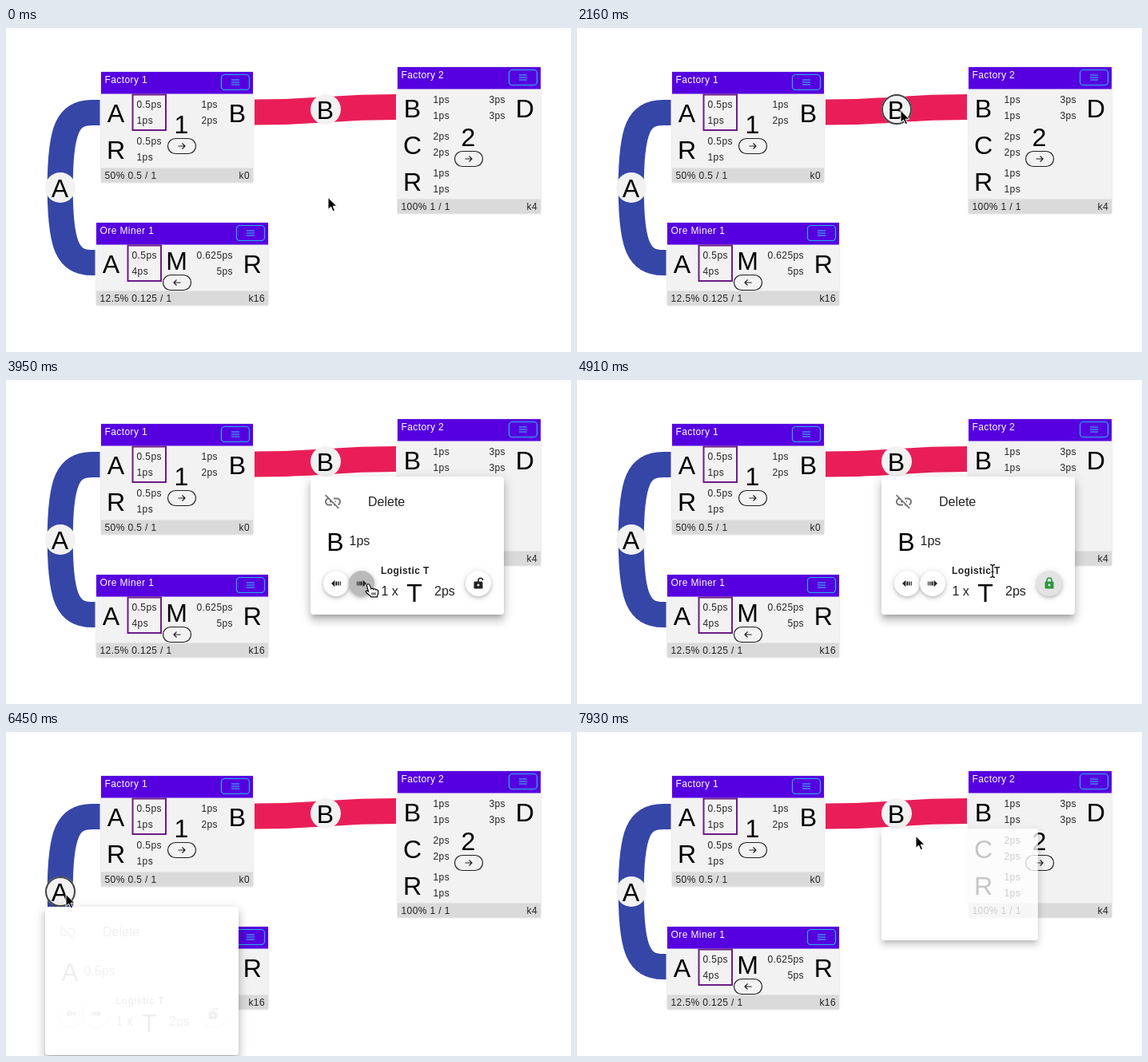
Animation of 707 by 406 pixels, one loop 8000 ms. Source, as an HTML page:

```html
<!DOCTYPE html>
<html lang="en">
<head>
<meta charset="utf-8">
<title>Factory planner</title>
<style>
  html, body { margin: 0; width: 100%; height: 100%; overflow: hidden; background: #fff; }
  svg { position: absolute; left: 0; top: 0; overflow: visible; font-family: "Liberation Sans", Arial, sans-serif; }
  .small { font-size: 12px; letter-spacing: .4px; }
  .mid { font-size: 16px; }
  .big { font-size: 32px; text-anchor: middle; }
  .end { text-anchor: end; }
  .card { filter: drop-shadow(0 0 1px #0003); }
  .fab { filter: drop-shadow(0 2px 2px #0003) drop-shadow(0 1px 4px #0002); }
  .menu { position: absolute; width: 242px; border-radius: 4px; background: #fff; transform-origin: 0 0;
    box-shadow: 0 5px 5px -3px #0003, 0 8px 10px 1px #00000024, 0 3px 14px 2px #0000001f; }
</style>
</head>
<body>
<svg id="scene" width="707" height="406"></svg>
<svg id="pointer" width="707" height="406" style="z-index:2"></svg>
<script>
const LOOP = 8000;
const $ = id => document.getElementById(id);
const text = (x, y, s, cls = 'small', fill = '#222') =>
  `<text x="${x}" y="${y}" class="${cls}" fill="${fill}">${s}</text>`;
const rect = (x, y, w, h, attrs) => `<rect x="${x}" y="${y}" width="${w}" height="${h}" ${attrs}/>`;
const big = (x, y, s) => text(x, y, s, 'big', '#000');

// Each port: letter, upper rate, lower rate
function card({ x, y, w, h, title, inputs, output, recipe, px, py, dir, boxed, load, key }) {
  const r = x + w;
  const rates = (tx, i, [, a, b], cls) =>
    text(tx, y + 45 + i * 46, a, cls) + text(tx, y + 65 + i * 46, b, cls);
  return `<g class="card">${rect(x, y, w, h, 'fill="#f2f2f2"')}</g>`
    + rect(x, y, w, 27.5, 'fill="#5600e0"')
    + rect(x, y + h - 18, w, 18, 'fill="#dadada"')
    + text(x + 4.5, y + 13.6, title, 'small', '#fff')
    + rect(r - 39.5, y + 3.5, 35, 19, 'rx="4" fill="none" stroke="#25b4e4" stroke-width="1.2"')
    + `<path d="M${r - 27} ${y + 10}h10m-10 3h10m-10 3h10" stroke="#35cdea"/>`
    + inputs.map((p, i) => big(x + 18.5, y + 63 + i * 46.2, p[0]) + rates(x + 44.5, i, p)).join('')
    + big(r - 19.7, y + 63, output[0]) + rates(r - 44, 0, output, 'small end')
    + (boxed ? rect(x + 39.5, y + 28.5, 41.5, 44.5, 'fill="none" stroke="#6d1b86" stroke-width="2"') : '')
    + big(px - .5, py - 16, recipe)
    + rect(px - 17.5, py - 9.5, 35, 19, 'rx="9.5" fill="none" stroke="#222" stroke-width="1.2"')
    + `<path transform="translate(${px} ${py}) scale(${dir} 1)" d="M-4.5 0h8.5M.5-3.5 4 0 .5 3.5" fill="none" stroke="#222" stroke-width="1.2"/>`
    + text(x + 4.5, y + h - 5, load) + text(r - 4, y + h - 5, key, 'small end');
}

const bubbles = [
  { id: 'ringA', x: 68, y: 200, name: 'A' },
  { id: 'ringB', x: 400, y: 102, name: 'B' },
];

$('scene').innerHTML =
  `<g fill="none" stroke-width="32">
    <path stroke="#3646a6" d="M117.5 106H108C78 106 67.7 125 67.7 200S78 294 108 294H111.5"/>
    <path stroke="#e91e58" d="M311 105.5C400 105.5 400 99 488 99"/>
  </g>`
  + card({ x: 119, y: 55, w: 190, h: 138.5, title: 'Factory 1', boxed: true, recipe: '1', px: 220, py: 148, dir: 1,
    inputs: [['A', '0.5ps', '1ps'], ['R', '0.5ps', '1ps']], output: ['B', '1ps', '2ps'], load: '50% 0.5 / 1', key: 'k0' })
  + card({ x: 490, y: 49, w: 179, h: 183.5, title: 'Factory 2', recipe: '2', px: 579, py: 164, dir: 1,
    inputs: [['B', '1ps', '1ps'], ['C', '2ps', '2ps'], ['R', '1ps', '1ps']], output: ['D', '3ps', '3ps'], load: '100% 1 / 1', key: 'k4' })
  + card({ x: 113, y: 244, w: 215, h: 103.5, title: 'Ore Miner 1', boxed: true, recipe: 'M', px: 214, py: 319, dir: -1,
    inputs: [['A', '0.5ps', '4ps']], output: ['R', '0.625ps', '5ps'], load: '12.5% 0.125 / 1', key: 'k16' })
  + bubbles.map(b => `<circle cx="${b.x}" cy="${b.y}" r="19" fill="#f2f2f2"/>
    <circle id="${b.id}" cx="${b.x}" cy="${b.y}" r="18" fill="none" stroke="#444" stroke-width="2"/>`
    + big(b.x - .5, b.y + 12.3, b.name)).join('');

const fab = (x, icon) => `<circle class="fab" cx="${x}" cy="134" r="16" fill="#fff"/>
  <circle class="press" cx="${x}" cy="134" r="16"/><g transform="translate(${x} 134)">${icon}</g>`;
const arrows = dir => `<path transform="scale(${dir} 1)" fill="#222"
  d="M-6-2.5h1v5h-1zM-4-2.5h1.4v5h-1.4zM-1.6-2.5H.6v5H-1.6zM1.6-4.2 6 0 1.6 4.2z"/>`;
const padlock = `<g class="lock">${rect(-5.5, -2.5, 11, 9, 'rx="1.2" fill="currentColor"')}
  <path class="shackle" fill="none" stroke="currentColor" stroke-width="1.6"/>
  <circle cy="2" r="1.4" fill="#fff"/></g>`;
const linkOff = `<path transform="translate(16 19.5)" fill="#757575" d="M17 7h-4v1.9h4c1.71 0 3.1 1.39 3.1 3.1 0 1.43-.98 2.63-2.31 2.98l1.46 1.46C20.88 15.61 22 13.95 22 12c0-2.76-2.24-5-5-5zm-1 4h-2.19l2 2H16zM2 4.27l3.11 3.11C3.29 8.12 2 9.91 2 12c0 2.76 2.24 5 5 5h4v-1.9H7c-1.71 0-3.1-1.39-3.1-3.1 0-1.59 1.21-2.9 2.76-3.07L8.73 11H8v2h2.73L13 15.27V17h1.73l4.01 4L20 19.74 3.27 3z"/>`;

function makeMenu(x, y, h, name, rate) {
  const el = document.createElement('div');
  el.className = 'menu';
  el.style.left = x + 'px';
  el.style.top = y + 'px';
  el.style.height = h + 'px';
  el.innerHTML = `<svg width="242" height="${h}">${linkOff}`
    + text(72, 37, 'Delete', 'mid') + big(31, 92.5, name) + text(48.5, 85.5, rate, 'mid')
    + fab(32, arrows(-1)) + fab(64, arrows(1)) + fab(210, padlock)
    + `<g font-weight="bold">${text(88, 122, 'Logistic T')}</g>`
    + text(88.5, 149, '1 x', 'mid') + big(130, 156.5, 'T') + text(155, 149, '2ps', 'mid') + '</svg>';
  document.body.append(el);
  return el;
}
const menuB = makeMenu(381, 121, 173, 'B', '1ps');
const menuA = makeMenu(48.5, 219, 186, 'A', '0.5ps');

const cursors = {
  arrow: '<path d="M0 0V15l3.6-3.3 2.5 5.6 2.4-1.1-2.4-5.4h4.8z" fill="#000" stroke="#fff"/>',
  hand: '<path d="M-2.5 1.5C-3-1 .3-1.5 1.2 1L3 5.5C4 4.2 5.6 4.5 6 6 7 4.9 8.6 5.2 9 6.7 10.2 6 11.5 6.6 11.6 8V11C11.6 13 10.4 13.8 10.4 15.5H3C2 13.5-1.5 12-3.5 9.5-4.6 8-2.5 7-.5 8.6Z" fill="#fff" stroke="#000" stroke-width="1.2"/><path d="M4 10v3m2-3v3m2-3v3" stroke="#000"/>',
  beam: '<path d="M-3-8Q0-8 0-5.5Q0-8 3-8M0-6V6M-3 8Q0 8 0 5.5Q0 8 3 8M-1.5 1h3" fill="none" stroke="#fff" stroke-width="2.6"/><path d="M-3-8Q0-8 0-5.5Q0-8 3-8M0-6V6M-3 8Q0 8 0 5.5Q0 8 3 8M-1.5 1h3" fill="none" stroke="#000" stroke-width="1.2"/>',
};

// The picture advances in 80 ms steps inside these spans and rests between them
const spans = [[0, 0], [80, 320], [1100, 1100], [1270, 1270], [1440, 2160], [2670, 4350],
  [4510, 5950], [6290, 6690], [7200, 7680], [7930, 7930]];
function step(t) {
  const [from, to] = spans.filter(s => s[0] <= t).pop();
  return Math.min(to, from + 80 * Math.floor((t - from) / 80));
}

const clamp = u => Math.max(0, Math.min(1, u));
function track(keys, t) {
  let i = keys.findIndex(k => k[0] > t);
  if (i < 0) i = keys.length;
  const a = keys[Math.max(0, i - 1)], b = keys[Math.min(i, keys.length - 1)];
  const u = clamp((t - a[0]) / (b[0] - a[0] || 1)), e = u * u * (3 - 2 * u);
  return a.slice(1).map((v, n) => v + (b[n + 1] - v) * e);
}

const path = [[0, 403, 213], [320, 399, 94], [1100, 399, 94], [1270, 398, 98], [1360, 398, 98],
  [1840, 283, 381], [2080, 418, 140], [2160, 405, 104], [2590, 405, 104], [2750, 425, 140],
  [3390, 454, 257], [4030, 454, 257], [4350, 588, 258], [4510, 588, 258], [4910, 520, 240],
  [5310, 338, 203], [5390, 338, 203], [5950, 75, 204], [7120, 75, 204], [7200, 105, 203],
  [7680, 406, 104], [7850, 406, 104], [7930, 424, 131]];
const pressNext = [[3550, 0], [3870, .27], [3950, .27], [4270, 0]];
const pressLock = [[4270, 0], [4510, .22], [5310, 0]];

function drawMenu(el, t, open, close) {
  const closing = t > close;
  const p = closing ? clamp(1 - (t - close) / 150) : 1 - (1 - clamp((t - open) / 120)) ** 2.7;
  el.style.display = p > 0 ? '' : 'none';
  el.style.opacity = p ** 1.2;
  el.style.transform = `scale(${p})`;
  el.firstChild.style.opacity = closing ? 0 : clamp((t - open - 80) / 370) ** 2.7;
}

function drawPresses(el, next, lock, locked) {
  [0, next, lock].forEach((v, i) => el.querySelectorAll('.press')[i].setAttribute('fill-opacity', v));
  el.querySelector('.lock').style.color = locked ? '#2e9540' : '#222';
  el.querySelector('.shackle').setAttribute('d',
    locked ? 'M-3-2V-4A3 3 0 0 1 3-4V-2' : 'M0-2V-4A2.8 2.8 0 0 1 5.6-4');
}

function render(now) {
  const t = step(now % LOOP);
  const [x, y] = track(path, t);
  const near = (cx, cy, r) => Math.hypot(x - cx, y - cy) < r;

  for (const b of bubbles)
    $(b.id).style.display = t >= 1100 && near(b.x, b.y, 19) ? '' : 'none';

  if (t < 7800) drawMenu(menuB, t, 2616, 5318);
  else drawMenu(menuB, t, 7875, Infinity);
  drawMenu(menuA, t, 6236, 7120);
  drawPresses(menuB, track(pressNext, t)[0], track(pressLock, t)[0], t >= 4510);
  drawPresses(menuA, 0, 0, false);

  const inMenu = t > 2670 && t < 5390;
  const overFab = [413, 445, 591].some(cx => near(cx, 255, 16));
  const overLabel = x > 469 && x < 530 && y > 232 && y < 247;
  const kind = inMenu && overFab ? 'hand' : inMenu && overLabel ? 'beam' : 'arrow';
  $('pointer').innerHTML = `<g transform="translate(${x} ${y - .6})">${cursors[kind]}</g>`;
}

function loop() {
  render(performance.now());
  requestAnimationFrame(loop);
}
loop();
</script>
</body>
</html>
```
